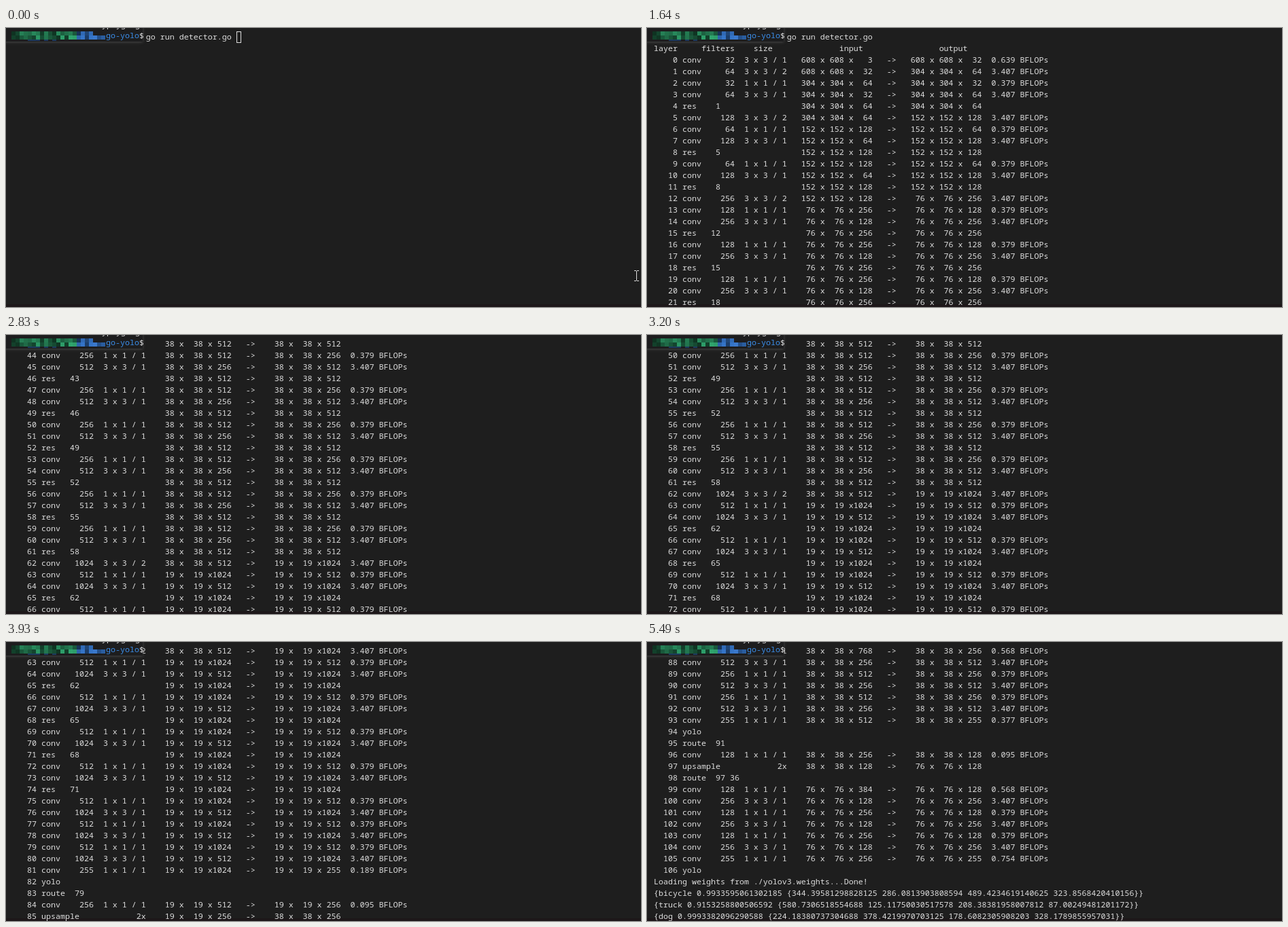
An HTML page with a canvas that plays this animation: 934 px wide and 411 px high, repeating every 6.23 s.

```html
<!DOCTYPE html>
<html lang="en">
<head>
<meta charset="utf-8">
<title>go-yolo detector</title>
<style>
html, body { margin: 0; width: 100%; height: 100%; overflow: hidden; background: #1e1e1e; }
canvas { display: block; }
</style>
</head>
<body>
<canvas id="stage" width="934" height="411"></canvas>
<script>
const ctx = document.getElementById('stage').getContext('2d');
const LOOP = 6230, LEFT = 10, TOP = 5, CHAR = 7, LINE = 17, ROWS = 24;
const FONT = '500 11.667px "Noto Sans Mono", "DejaVu Sans Mono", monospace';
const BACK = '#1e1e1e', INK = '#dedede';

// Network listing, built layer by layer
function buildLayers() {
  const rows = [], outputs = [];
  let size = 608, depth = 3;
  const pad = (value, width) => String(value).padStart(width);
  const dims = (s, d) => `${pad(s, 4)} x${pad(s, 4)} x${pad(d, 4)}`;
  const add = text => {
    rows.push(pad(rows.length, 5) + ' ' + text);
    outputs.push([size, depth]);
  };
  const conv = (filters, k, stride = 1) => {
    const before = dims(size, depth);
    size /= stride;
    const flops = 2 * filters * k * k * depth * size * size / 1e9;
    depth = filters;
    add(`conv  ${pad(filters, 5)} ${pad(k, 2)} x${pad(k, 2)} /${pad(stride, 2)}  ` +
      `${before}   ->  ${dims(size, depth)}  ${flops.toFixed(3)} BFLOPs`);
  };
  const res = () => {
    const d = dims(size, depth);
    add(`res  ${pad(rows.length - 3, 3)}${' '.repeat(16)}${d}   ->  ${d}`);
  };
  const route = (...from) => {
    size = outputs[from[0]][0];
    depth = from.reduce((sum, i) => sum + outputs[i][1], 0);
    add('route  ' + from.join(' '));
  };
  const upsample = () => {
    const before = dims(size, depth);
    size *= 2;
    add(`upsample${' '.repeat(12)}2x  ${before}   ->  ${dims(size, depth)}`);
  };
  const head = filters => {
    for (let i = 0; i < 3; i++) {
      conv(filters, 1);
      conv(filters * 2, 3);
    }
    conv(255, 1);
    add('yolo');
  };

  conv(32, 3);
  for (const [filters, blocks] of [[64, 1], [128, 2], [256, 8], [512, 8], [1024, 4]]) {
    conv(filters, 3, 2);
    for (let i = 0; i < blocks; i++) {
      conv(filters / 2, 1);
      conv(filters, 3);
      res();
    }
  }
  head(512);
  for (const [last, skip, filters] of [[79, 61, 256], [91, 36, 128]]) {
    route(last);
    conv(filters, 1);
    upsample();
    route(rows.length - 1, skip);
    head(filters);
  }
  return rows;
}

const lines = [
  ' '.repeat(28) + 'go run detector.go ',
  'layer     filters    size              input                output',
  ...buildLayers(),
  'Loading weights from ./yolov3.weights...Done!',
  '{bicycle 0.9933595061302185 {344.39581298828125 286.0813903808594 489.4234619140625 323.8568420410156}}',
  '{truck 0.9153258800506592 {580.7306518554688 125.11750030517578 208.38381958007812 87.00249481201172}}',
  '{dog 0.9993382096290588 {224.18380737304688 378.4219970703125 178.6082305908203 328.1789855957031}}'
];

// Bursts of screen refreshes: start, gap, refreshes, lines printed at the end
const bursts = [
  [780, 220, 2, 2], [1250, 0, 1, 5], [1470, 85, 3, 24], [2100, 260, 2, 37], [2490, 0, 1, 45],
  [2650, 90, 3, 69], [2950, 83, 4, 75], [3300, 110, 3, 80], [3790, 80, 7, 107], [4360, 200, 2, 113]
];

// Number of refreshes done by time t
const refreshes = (t, start, gap, total) =>
  t < start ? 0 : gap ? Math.min(total, 1 + Math.floor((t - start) / gap)) : total;

function printed(t) {
  let count = 0;
  for (const [start, gap, total, end] of bursts)
    count += (end - count) * refreshes(t, start, gap, total) / total * (t >= start);
  return Math.round(count);
}

function rect(color, x, y, w, h) {
  ctx.fillStyle = color;
  ctx.fillRect(x, y, w, h);
}

function write(text, x, baseline, color = INK) {
  ctx.fillStyle = color;
  ctx.fillText(text, x, baseline);
}

function drawCursor(t, row) {
  // Waits after the command, at a line start, then after each layer number
  const column = row === 0 ? lines[0].length : row === 1 ? 0 : 6;
  const x = LEFT + column * CHAR, y = TOP + row * LINE;
  write(lines[row].slice(0, column), LEFT, 17 + row * LINE);
  rect(INK, x, y, CHAR, LINE);
  if (t < 320) rect(BACK, x + 1, y + 1, CHAR - 2, LINE - 2);
}

function drawTerminal(t) {
  const count = printed(t), first = Math.max(0, count - ROWS);
  lines.slice(first, count).forEach((line, row) => write(line, LEFT, 17 + row * LINE));
  if (t < 1470) drawCursor(t, count);
}

// Pixelated prompt, pinned over the first row
function drawPrompt() {
  ctx.save();
  ctx.shadowColor = '#484848';
  ctx.shadowBlur = 4;
  ctx.shadowOffsetY = 1;
  rect('#1d1d1e', -4, -4, 205, 24);
  ctx.restore();

  let seed = 11;
  const random = () => (seed = seed * 16807 % 2147483647) / 2147483647;
  for (let i = 0; i < 23; i++) {
    for (let row = 0; row < 2; row++) {
      const light = 13 + 30 * random() * Math.min(1, (i + 1) / 4);
      const color = i < 16 ? `hsl(152 55% ${light}%)` : `hsl(214 58% ${light + 8}%)`;
      if (row || i < 20) rect(color, 8 + i * 6, 5 + row * 6, 6, 6);
    }
    if (i > 3 && i < 11 && random() < 0.7) rect('#1d3c60', 8 + i * 6, 17, 6, 2);
  }
  write('yp yg  g', 141, -1);
  write('go-yolo', 147, 15, '#3b8eea');
  write('$', 196, 15);
}

// The mouse eases in from below, rests, then leaves along a diagonal
function drawPointer(t) {
  const enter = refreshes(t, 4030, 80, 4);
  const leave = t < 70 ? 3 : refreshes(t, 5250, 80, 4);
  if (!enter && !leave || leave === 4) return;
  const away = t < 70 ? 0 : (1 - enter / 4) ** 2;
  const x = Math.round(887 + 43 * away + leave * 40 / 3);
  const y = Math.round(325 + 139 * away + leave * 40 / 3);
  for (const end of [y - 8, y + 7]) {
    rect(INK, x - 3, end, 3, 1);
    rect(INK, x + 1, end, 3, 1);
  }
  rect(INK, x, y - 7, 1, 14);
}

function draw(t) {
  rect(BACK, 0, 0, 934, 411);
  rect('#1d1719', 0, 407, 934, 4);
  ctx.font = FONT;
  drawTerminal(t);
  drawPrompt();
  drawPointer(t);
}

const start = performance.now();
function tick() {
  draw((performance.now() - start) % LOOP);
  requestAnimationFrame(tick);
}
tick();
</script>
</body>
</html>
```
